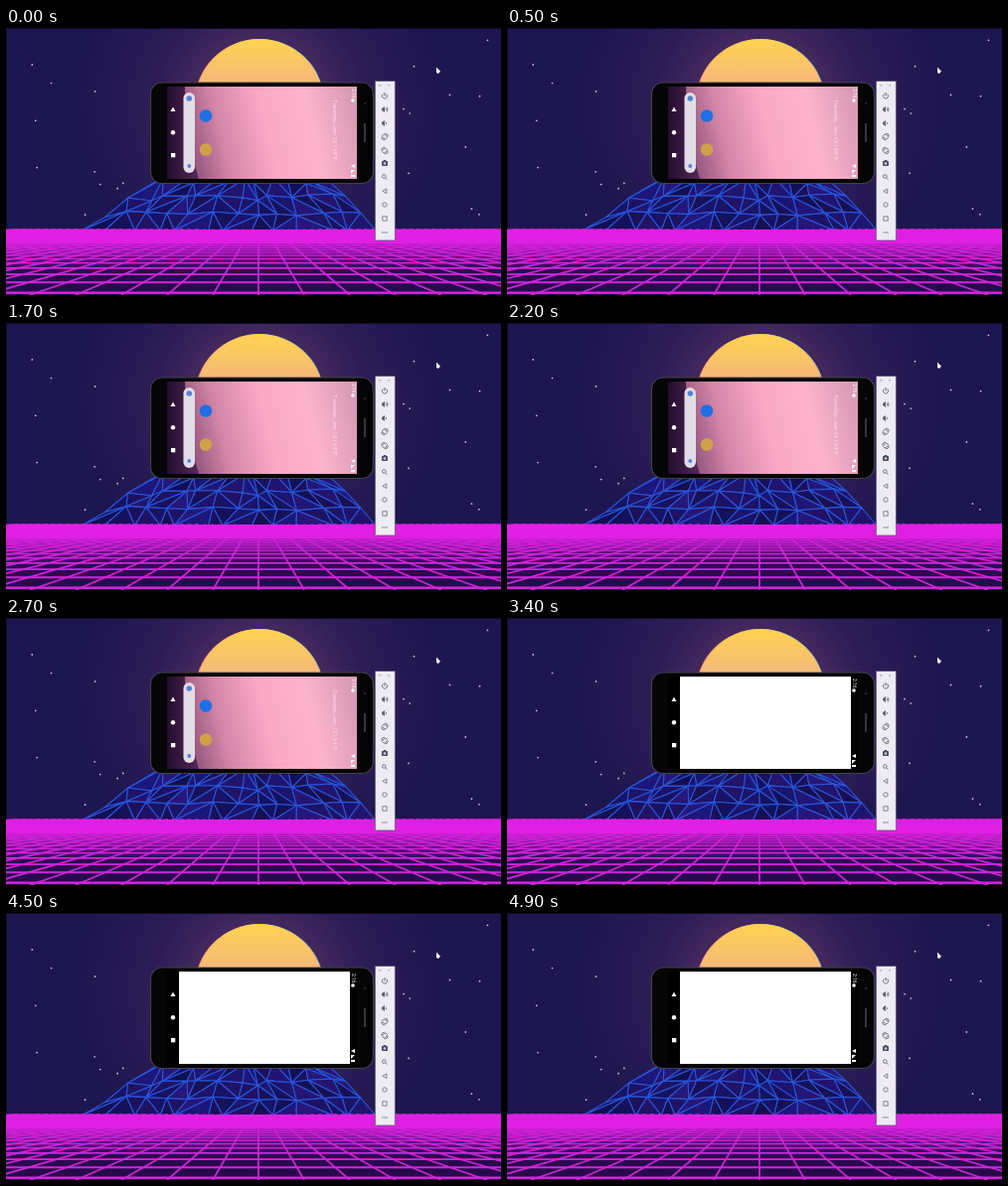
Write an HTML page with a canvas that moves like this. It is 498 px wide and 269 px high and loops after 5000 ms.

```html
<!DOCTYPE html>
<html lang="en">
<head>
<meta charset="utf-8">
<title>Retro grid desktop</title>
<style>
html, body { margin: 0; width: 100%; height: 100%; overflow: hidden; background: #1e1650; }
canvas { display: block; width: 100vw; height: 100vh; }
</style>
</head>
<body>
<canvas id="stage" width="498" height="269"></canvas>
<script>
const W = 498, H = 269, LOOP = 5000, STEP = 100;
const LAUNCH = 2900, LAUNCH_TIME = 300;
const HORIZON = 203, CENTER = 254, VANISH_Y = 190;
const screen = { x: 162, y: 59, w: 191, h: 93 };
const stage = document.getElementById('stage');
let c = stage.getContext('2d');

function seeded(seed) {
  return () => (seed = seed * 16807 % 2147483647) / 2147483647;
}
const mix = (a, b, t) => a + (b - a) * t;

// Spreads the colors evenly along the line.
function gradient(x0, y0, x1, y1, ...colors) {
  const g = c.createLinearGradient(x0, y0, x1, y1);
  colors.forEach((color, i) => g.addColorStop(i / (colors.length - 1), color));
  return g;
}
function rect(x, y, w, h, fill) {
  c.fillStyle = fill;
  c.fillRect(x, y, w, h);
}
function rounded(x, y, w, h, r, fill, stroke) {
  c.beginPath();
  c.roundRect(x, y, w, h, r);
  if (fill) { c.fillStyle = fill; c.fill(); }
  if (stroke) { c.strokeStyle = stroke; c.stroke(); }
}
function disc(x, y, r, fill) {
  c.beginPath();
  c.arc(x, y, r, 0, Math.PI * 2);
  c.fillStyle = fill;
  c.fill();
}
function ring(x, y, r, from = 0, to = Math.PI * 2) {
  c.beginPath();
  c.arc(x, y, r, from, to);
  c.stroke();
}
function poly(points, fill, stroke) {
  c.beginPath();
  for (const [x, y] of points) c.lineTo(x, y);
  c.closePath();
  if (fill) { c.fillStyle = fill; c.fill(); }
  if (stroke) { c.strokeStyle = stroke; c.stroke(); }
}
function line(x0, y0, x1, y1, color, width) {
  c.beginPath();
  c.moveTo(x0, y0);
  c.lineTo(x1, y1);
  c.strokeStyle = color;
  c.lineWidth = width;
  c.stroke();
}
function downText(text, x, y, size, color) {
  c.save();
  c.translate(x, y);
  c.rotate(Math.PI / 2);
  c.font = size + 'px Roboto, sans-serif';
  c.textBaseline = 'middle';
  c.fillStyle = color;
  c.fillText(text, 0, 0);
  c.restore();
}

// Paints artwork once into its own layer.
function layer(...paints) {
  const canvas = document.createElement('canvas');
  canvas.width = W;
  canvas.height = H;
  const saved = c;
  c = canvas.getContext('2d');
  for (const paint of paints) paint();
  c = saved;
  return canvas;
}

function paintSky() {
  rect(0, 0, W, H, '#1e1650');
  const glow = c.createRadialGradient(255, 76, 55, 255, 76, 180);
  glow.addColorStop(0, '#4a2c60');
  glow.addColorStop(0.4, '#2d1d57');
  glow.addColorStop(1, '#1e1650');
  rect(0, 0, W, HORIZON, glow);

  const random = seeded(41);
  for (let i = 0; i < 20; i++) {
    const x = i % 2 ? mix(10, 120, random()) : mix(400, 490, random());
    disc(x, mix(10, 192, random()), 0.85, '#cfc9e6');
  }
  disc(254.4, 76, 65, '#d94b5c');
  disc(255.6, 76, 65, '#3f93b8');
  disc(255, 76, 65, gradient(0, 11, 0, 54, '#ffd350', '#f6b978'));
  rect(0, 0, W, 1, '#120d2c');
  rect(0, 0, 1, HORIZON, '#120d2c');
}

// A jittered triangle mesh, narrow at the top and wide at the horizon.
function paintMountain() {
  const rows = 3, columns = 12, random = seeded(7);
  const mesh = [];
  for (let row = 0; row <= rows; row++) {
    const down = row / rows;
    const left = mix(146, 76, down), right = mix(326, 372, down);
    mesh.push(Array.from({ length: columns + 1 }, (_, column) => {
      const inside = column > 0 && column < columns ? 1 : 0;
      const x = mix(left, right, column / columns) + inside * mix(-7, 7, random());
      const y = mix(154, 204, down) + (row < rows ? mix(-4, 4, random()) : 0);
      return [x, y];
    }));
  }
  c.lineWidth = 1.1;
  c.lineJoin = 'round';
  for (let row = 0; row < rows; row++) {
    for (let column = 0; column < columns; column++) {
      const [a, b] = mesh[row].slice(column, column + 2);
      const [d, e] = mesh[row + 1].slice(column, column + 2);
      const triangles = random() < 0.5 ? [[a, b, d], [b, e, d]] : [[a, b, e], [a, e, d]];
      for (const triangle of triangles) {
        poly(triangle, `hsl(${mix(242, 250, random())} 68% ${mix(19, 29, random())}%)`, '#2856dc');
      }
    }
  }
}

function paintFloor() {
  rect(0, HORIZON, W, H - HORIZON, gradient(0, HORIZON, 0, H, '#4a0c6c', '#2f0b55', '#220b48'));
  const depth = H - VANISH_Y, top = (HORIZON - VANISH_Y) / depth;
  for (let i = -32; i <= 32; i++) {
    line(CENTER + i * 46 * top, HORIZON, CENTER + i * 46, H, '#c824d0', 1.8);
  }
  for (let n = 6.25; n < 20; n++) {
    line(0, VANISH_Y + 480 / n, W, VANISH_Y + 480 / n, '#d224da', 15 / n);
  }
  rect(0, HORIZON, W, 14, '#de20e2');
  rect(0, HORIZON + 14, W, 26, gradient(0, HORIZON + 14, 0, HORIZON + 40, 'rgba(206,30,214,.75)', 'rgba(190,28,206,0)'));
}

function paintCursor() {
  poly([[433, 39.5], [433, 45], [435, 46], [437, 43.4]], '#f3f1fa');
}

function paintPhone() {
  c.lineWidth = 1.2;
  rounded(145.5, 55, 224, 101.5, 11.5, '#050506', '#424147');
  rect(360, 96, 2, 19, '#37363b');
  disc(361, 76, 1.2, '#25252c');
}

function paintHome() {
  const { x, y, w, h } = screen;
  rect(x, y, w, h, gradient(176, 132, 352, 90, '#80456f', '#d486a8', '#f9a9c5', '#fdb3cb', '#d99bb6'));
  c.beginPath();
  c.moveTo(x, y);
  c.lineTo(180, y);
  c.quadraticCurveTo(181, 110, 194, y + h);
  c.lineTo(x, y + h);
  c.fillStyle = gradient(x, 0, 194, 0, '#230d2d', '#54285a');
  c.fill();
  rounded(178.5, 65, 11.5, 81, 5.7, '#e2dde5');
  disc(184.3, 71, 2.8, '#5483d4');
  disc(184.3, 139, 1.9, '#5483d4');
  disc(201, 88.5, 6.3, '#1f70e4');
  disc(201, 122.5, 6.3, '#d0a04a');
  downText('Tuesday, Jan 12 | 54°F', 330.5, 72, 6.2, 'rgba(255,232,242,.8)');
}

function paintSystemBars() {
  poly([[168, 79.5], [170.5, 84], [165.5, 84]], '#fff');
  disc(168, 105.3, 2.2, '#fff');
  rect(166, 126, 4.3, 4.3, '#fff');
  downText('2:16', 349, 61, 5, '#fff');
  disc(349, 73, 1.8, '#fff');
  poly([[347, 139], [351, 137], [351, 141]], '#fff');
  poly([[347, 143], [351, 143], [347, 147]], '#fff');
  rect(347, 148, 4, 2, '#fff');
}

function paintSpeaker(x, y, waves) {
  poly([[x - 3, y - 1], [x, y - 3], [x, y + 3], [x - 3, y + 1]], '#666674');
  for (let i = 1; i <= waves; i++) ring(x, y, i * 1.5, -0.9, 0.9);
}

function paintRotate(x, y, side) {
  c.save();
  c.translate(x, y);
  c.scale(side, 1);
  c.rotate(-Math.PI / 4);
  rounded(-1.6, -2.4, 3.2, 4.8, 0.5, null, c.strokeStyle);
  ring(0, 0, 3.4, -0.7, 0.7);
  ring(0, 0, 3.4, 2.4, 3.8);
  c.restore();
}

function paintToolbar() {
  const x = 381;
  c.lineWidth = 0.7;
  rounded(371.4, 53.5, 20, 160.5, 0.5, '#eeebf3', '#57536a');
  rect(375, 57.5, 2.5, 0.8, '#8d8b98');
  rect(384, 57.5, 2, 0.8, '#8d8b98');
  c.strokeStyle = '#666674';
  c.lineWidth = 0.9;
  ring(x, 68.5, 2.6, -0.9, 4.05);
  rect(x - 0.5, 65, 1, 3.5, '#666674');
  paintSpeaker(x, 82, 2);
  paintSpeaker(x, 96, 1);
  paintRotate(x, 109.5, 1);
  paintRotate(x, 123.5, -1);
  rounded(378, 134, 6, 5, 0.8, '#4b4e66');
  rect(379.7, 133, 2.6, 2, '#4b4e66');
  disc(x, 136.5, 1.3, '#c9cbd8');
  ring(380.3, 149.5, 1.8);
  line(381.8, 151, 383.5, 152.7, '#666674', 0.9);
  poly([[378.8, 164.3], [382.8, 162], [382.8, 166.6]], null, '#777784');
  ring(x, 178, 2.2);
  c.strokeRect(378.8, 189.8, 4.4, 4.4);
  for (let i = -1; i <= 1; i++) disc(x + i * 2, 206, 0.65, '#666674');
}

const scene = layer(paintSky, paintMountain, paintFloor, paintCursor, paintPhone, paintHome, paintSystemBars, paintToolbar);

function drawLaunch(time) {
  const progress = Math.min(1, Math.max(0, (time - LAUNCH) / LAUNCH_TIME));
  if (!progress) return;
  const eased = 1 - (1 - progress) ** 3;
  const scale = mix(0.8, 1, eased);
  c.save();
  c.globalAlpha = eased;
  rect(screen.x, screen.y, screen.w, screen.h, '#000');
  c.translate(260, 105.5);
  c.scale(scale, scale);
  rect(-86, -46.5, 172, 93, '#fff');
  c.restore();
  paintSystemBars();
}

const start = performance.now();
function tick() {
  const elapsed = (performance.now() - start) % LOOP;
  c.drawImage(scene, 0, 0);
  drawLaunch(Math.floor(elapsed / STEP) * STEP);
  requestAnimationFrame(tick);
}
tick();
</script>
</body>
</html>
```
